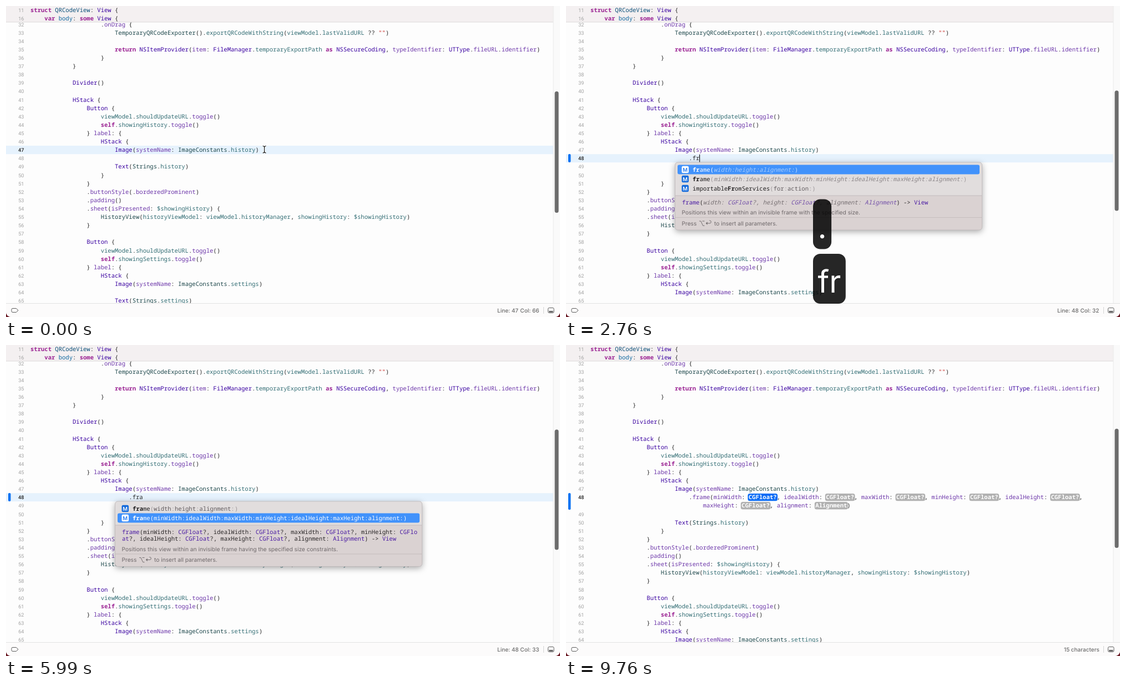
These frames come from a looping animation (998x561 px, 9990 ms). An HTML page with a canvas:

```html
<!DOCTYPE html>
<html lang="en">
<head>
<meta charset="utf-8">
<title>Code completion</title>
<style>
html, body { margin: 0; width: 100%; height: 100%; overflow: hidden; background: #fdfdfd; }
canvas { display: block; }
</style>
</head>
<body>
<canvas id="stage" width="998" height="561"></canvas>
<script>
const ctx = document.getElementById('stage').getContext('2d');
ctx.textRendering = 'geometricPrecision';

const LOOP = 9990;
const CHAR = 19 / 3, ROW = 15.11, LEFT = 44;
const MONO = '10.555px "Noto Sans Mono", monospace';
const SANS = '10.2px Inter, sans-serif';
const PLAIN = '#262626';

// Moments of the key presses
const ENTER = 1040, DOT = 1890, MARK = 2030, LETTERS = [2450, 2650, 3030];
const DOWN = 4090, OPTION = 5190, INSERT = 7170;

const palette = {
  '#9b2393': 'struct var some return as self',
  '#0b4f79': 'QRCodeView',
  '#0f68a0': 'body',
  '#3900a0': 'View NSItemProvider FileManager NSSecureCoding UTType Divider HStack Button Image Text',
  '#1c464a': 'TemporaryQRCodeExporter ImageConstants Strings HistoryView',
  '#326d74': 'exportQRCodeWithString viewModel lastValidURL temporaryExportPath shouldUpdateURL ' +
    'showingHistory $showingHistory history historyViewModel historyManager showingSettings settings',
  '#6c36a9': 'onDrag item typeIdentifier fileURL identifier toggle label systemName buttonStyle ' +
    'borderedProminent padding sheet isPresented frame minWidth idealWidth maxWidth minHeight ' +
    'idealHeight maxHeight alignment',
  '#c41a16': '""'
};
const wordColor = {};
for (const [color, words] of Object.entries(palette))
  for (const word of words.split(' ')) wordColor[word] = color;

const FIRST_LINE = 32;
const source = `                    .onDrag {
                        TemporaryQRCodeExporter().exportQRCodeWithString(viewModel.lastValidURL ?? "")

                        return NSItemProvider(item: FileManager.temporaryExportPath as NSSecureCoding, typeIdentifier: UTType.fileURL.identifier)
                    }
            }

            Divider()

            HStack {
                Button {
                    viewModel.shouldUpdateURL.toggle()
                    self.showingHistory.toggle()
                } label: {
                    HStack {
                        Image(systemName: ImageConstants.history)

                        Text(Strings.history)
                    }
                }
                .buttonStyle(.borderedProminent)
                .padding()
                .sheet(isPresented: $showingHistory) {
                    HistoryView(historyViewModel: viewModel.historyManager, showingHistory: $showingHistory)
                }

                Button {
                    viewModel.shouldUpdateURL.toggle()
                    self.showingSettings.toggle()
                } label: {
                    HStack {
                        Image(systemName: ImageConstants.settings)

                        Text(Strings.settings)`.split('\n');

const longLabels = ['minWidth', 'idealWidth', 'maxWidth', 'minHeight', 'idealHeight', 'maxHeight', 'alignment'];
const shortLabels = ['width', 'height', 'alignment'];
const withTypes = labels => labels.map(l => l + (l === 'alignment' ? ': Alignment' : ': CGFloat?')).join(', ');
const joined = labels => labels.join(':') + ':';
const choices = [
  { name: 'frame', params: joined(shortLabels), optional: true },
  { name: 'frame', params: joined(longLabels), optional: true },
  { name: 'importableFromServices', params: 'for:action:', optional: false }
];
const details = [
  { signature: `frame(${withTypes(shortLabels)}) -> View`,
    note: 'Positions this view within an invisible frame with the specified size.' },
  { signature: `frame(${withTypes(longLabels)}) -> View`,
    note: 'Positions this view within an invisible frame having the specified size constraints.' }
];

const rowY = row => 48 + (row - 33) * ROW;
const columnX = column => LEFT + column * CHAR;

function rect(x, y, w, h, color, radius = 0) {
  ctx.fillStyle = color;
  ctx.beginPath();
  ctx.roundRect(x, y, w, h, radius);
  ctx.fill();
}

function text(str, x, y, color, font, align = 'left') {
  ctx.font = font;
  ctx.fillStyle = color;
  ctx.textAlign = align;
  ctx.fillText(str, x, y + 3.7);
}

// Monospaced text; returns the x after its last column
function mono(str, x, y, color, style = '') {
  text(str, x, y, color, style + ' ' + MONO);
  return x + str.length * CHAR;
}

function codeLine(line, x, y, firstSelected) {
  for (const token of line.match(/CGFloat\?|Alignment|[\w$]+|"[^"]*"| +|[^\w$" ]/g) || []) {
    if (/^(CGFloat\?|Alignment)$/.test(token)) {
      rect(x - 1.5, y - 6.7, token.length * CHAR + 3, 13.4, firstSelected ? '#0a6cf5' : '#b1b1b1', 3.5);
      firstSelected = false;
      x = mono(token, x, y, '#fff', 'bold');
    } else {
      const color = wordColor[token] || PLAIN;
      x = mono(token, x, y, color, color === '#9b2393' ? 'bold' : '');
    }
  }
}

function lineNumber(n, y, current) {
  text(n, 32.5, y, current ? '#222' : '#a3a3a3', (current ? '500 ' : '') + '9.2px Roboto, sans-serif', 'right');
}

const typedLetters = t => 'fra'.slice(0, LETTERS.filter(at => at <= t).length);

function drawEditor(t) {
  const entered = t >= ENTER, inserted = t >= INSERT;
  const current = entered ? 48 : 47;
  const typed = t >= DOT ? '.' + typedLetters(t) : '';
  const column = !entered ? 65 : typed ? 28 + typed.length : 24;

  if (!inserted) rect(0, rowY(current) - 7.5, 986, ROW, '#e6f2fd');

  source.forEach((line, i) => {
    const n = FIRST_LINE + i;
    const added = entered && n > 47;
    const y = rowY(n + (added ? (inserted ? 2 : 1) : 0));
    lineNumber(n + (added ? 1 : 0), y, !entered && n === 47);
    codeLine(line, LEFT, y);
  });

  if (entered) {
    const y = rowY(48);
    lineNumber(48, y, true);
    if (inserted) {
      const args = withTypes(longLabels), cut = args.indexOf(' maxHeight');
      codeLine('.frame(' + args.slice(0, cut), columnX(28), y, true);
      codeLine(args.slice(cut + 1) + ')', columnX(32), y + ROW);
    } else mono(typed, columnX(28), y, PLAIN);
    rect(4, rowY(t < MARK ? 49 : 48) - 7.7, 4.5, inserted ? 2 * ROW : ROW, '#0a73f2', 2);
  }

  const presses = [-600, ENTER, DOT, ...LETTERS, DOWN];
  const lastPress = Math.max(...presses.filter(at => at <= t));
  if (!inserted && (t - lastPress) % 1100 < 550)
    rect(columnX(column) - 0.2, rowY(current) - 7, 1.1, 14, '#000');
  return `${current},${column + 1}`.split(',');
}

function drawChrome(t, [line, column]) {
  rect(0, 0, 986, 29, '#f4f0f1');
  rect(0, 28.5, 986, 1, '#dcd9da');
  lineNumber(11, 7, false);
  lineNumber(16, 22, false);
  codeLine('struct QRCodeView: View {', LEFT, 7);
  codeLine('var body: some View {', columnX(4), 22);

  rect(986, 0, 12, 537, '#fafafa');
  rect(985.5, 0, 1, 537, '#e9e9e9');
  const [top, bottom] = t < ENTER ? [154, 373] : t < INSERT ? [152.5, 369.5] : [151, 366];
  rect(988.5, top, 7, bottom - top, '#6c6c6c', 3.5);

  rect(0, 536, 998, 25, '#fcfbfb');
  rect(0, 536, 998, 1, '#e2e2e2');
  const font = '500 10px Inter, sans-serif', gray = '#6c6c6c';
  if (t >= INSERT) text('15 characters', 961, 549, gray, font, 'right');
  else {
    text('Line: ' + line, 885, 549, gray, font);
    text('Col: ' + column, 960.5, 549, gray, font, 'right');
  }
  rect(968, 543, 1, 12, '#d4d4d4');
  ctx.strokeStyle = '#5c5c5c';
  ctx.lineWidth = 1;
  ctx.stroke(new Path2D('M12 545.5H18.5L22 549L18.5 552.5H12Q10 552.5 10 550.5V547.5Q10 545.5 12 545.5Z'));
  ctx.beginPath();
  ctx.roundRect(976.5, 544.5, 10.5, 9, 2);
  ctx.stroke();
  rect(978, 550, 7.5, 2.5, '#5c5c5c', 0.5);
}

function drawPointer() {
  const beam = new Path2D('M462.5 252.5Q465.5 252.5 465.5 255V262.5Q465.5 265 462.5 265M468.5 252.5Q465.5 252.5 465.5 255M465.5 262.5Q465.5 265 468.5 265');
  for (const [color, width] of [['#fff', 3], ['#111', 1.2]]) {
    ctx.strokeStyle = color;
    ctx.lineWidth = width;
    ctx.stroke(beam);
  }
}

// Key symbols inside a 90 px high cap
const symbols = {
  '↩': { width: 66.5 - 3.5, line: 'M29 45.5H52.5A12.75 12.75 0 0 0 52.5 20H49', fill: 'M15 45.5L30 31V60Z' },
  '⌥': { width: 63, line: 'M16 25H31L51 68H66M45 25H66', fill: '' },
  '↓': { width: 36, line: 'M27 21V54', fill: 'M27 69L12.5 53H41.5Z' }
};

function drawSymbol(name, color) {
  ctx.strokeStyle = ctx.fillStyle = color;
  ctx.lineWidth = 5;
  ctx.stroke(new Path2D(symbols[name].line));
  ctx.fill(new Path2D(symbols[name].fill));
}

function drawSymbols(names, x, y, scale, color) {
  ctx.save();
  ctx.translate(x, y);
  ctx.scale(scale, scale);
  for (const name of names) {
    drawSymbol(name, color);
    ctx.translate(symbols[name].width, 0);
  }
  ctx.restore();
}

function drawChoice({ name, params, optional }, y, match, selected, expanded) {
  if (selected) rect(201, y - 8.5, 544, 17, '#4192fb', 3);
  rect(208.5, y - 6.2, 12.5, 12.5, selected ? '#fff' : '#146bdc', 2.5);
  text('M', 214.7, y - 0.2, selected ? '#2a7df0' : '#fff', '600 9.5px Inter, sans-serif', 'center');

  const ink = selected ? '#fff' : '#1d1b1c';
  const start = name.toLowerCase().indexOf(match), end = start + match.length;
  let x = mono(name.slice(0, start), 228, y, ink);
  x = mono(name.slice(start, end), x, y, ink, 'bold');
  x = mono(name.slice(end), x, y, ink);

  const faint = optional && !expanded;
  const label = selected ? (faint ? '#a8cdfd' : '#fff') : faint ? '#8b8588' : '#625c5f';
  const mark = selected ? (faint ? '#c4defe' : '#fff') : '#9b9598';
  x = mono('(', x, y, selected ? '#fff' : mark);
  for (const part of params.match(/\w+|:/g))
    x = mono(part, x, y, part === ':' ? mark : label, faint ? 'italic' : '');
  mono(')', x, y, mark);
}

function drawSignature(signature, y, expanded) {
  const wrap = 84, close = signature.indexOf(')');
  for (const { 0: token, index } of signature.matchAll(/\w+|[^\w ]/g)) {
    const inside = index > 5 && index < close;
    const faint = inside && !expanded;
    const color = /^(frame|CGFloat|Alignment|View)$/.test(token)
      ? (faint ? '#7350a8' : '#4a1ba3') : faint ? '#777073' : '#2a2728';
    [...token].forEach((char, i) => {
      const column = index + i;
      mono(char, 209 + column % wrap * CHAR, y + Math.floor(column / wrap) * 12.5, color, faint ? 'italic' : '');
    });
  }
}

function drawPopup(t) {
  const match = typedLetters(t);
  const count = match.length < 3 ? 3 : 2;
  const selected = t >= DOWN ? 1 : 0;
  const expanded = t >= OPTION;
  const split = 291 + 17 * count;
  const noteY = split + 30.3 + selected * 12.5;
  const hintTop = noteY + 9.2;

  ctx.save();
  ctx.shadowColor = 'rgba(0,0,0,.35)';
  ctx.shadowBlur = 12;
  ctx.shadowOffsetY = 3;
  rect(196.5, 282, 553, hintTop + 22.5 - 282, '#dad2d2', 5);
  ctx.restore();
  rect(196.5, 282, 553, split - 282, '#e1dddd', [5, 5, 0, 0]);
  ctx.strokeStyle = '#bdb7b8';
  ctx.lineWidth = 0.8;
  ctx.beginPath();
  ctx.roundRect(196.5, 282, 553, hintTop + 22.5 - 282, 5);
  ctx.stroke();
  rect(197, split - 0.5, 552, 1, '#c4bcbd');
  rect(197, hintTop - 0.5, 552, 1, '#c6bebe');

  choices.slice(0, count).forEach((choice, i) =>
    drawChoice(choice, 295 + 17 * i, match, i === selected, expanded));
  drawSignature(details[selected].signature, split + 12, expanded);
  const gray = '#6f696b', hintY = hintTop + 10.5;
  text(details[selected].note, 208.5, noteY, gray, SANS);
  text('Press', 208.5, hintY, gray, SANS);
  drawSymbols('⌥↩', 237, hintY - 8.7, 0.19, gray);
  text('to insert all parameters.', 267, hintY, gray, SANS);
}

const caps = [
  { label: '↩', presses: [ENTER] },
  { label: '.', presses: [DOT] },
  { label: 'fra', presses: LETTERS },
  { label: '↓', presses: [DOWN] },
  { label: '⌥↩', presses: [INSERT] }
];

function drawCaps(t) {
  const shown = caps.filter(cap => cap.presses[0] <= t).reverse();
  shown.forEach(({ label, presses }, i) => {
    const done = presses.filter(at => at <= t);
    const opacity = 1 - (t - done[done.length - 1] - 1200) / 480;
    if (opacity <= 0) return;
    ctx.save();
    ctx.globalAlpha = Math.min(1, opacity);
    ctx.translate(445, 447 - 98.5 * i);
    const isSymbol = label[0] in symbols;
    const str = presses.length > 1 ? label.slice(0, done.length) : label;
    ctx.font = '56px Inter, sans-serif';
    const width = isSymbol
      ? [...str].reduce((sum, name) => sum + symbols[name].width, 20)
      : ctx.measureText(str).width + 17;
    rect(0, 0, width, 90, 'rgba(0,0,0,.85)', 13);
    if (isSymbol) drawSymbols(str, 0, 0, 1, '#fff');
    else text(str, 8.5, 66.5, '#fff', '56px Inter, sans-serif');
    ctx.restore();
  });
}

function draw(now) {
  const t = now % LOOP;
  rect(0, 0, 998, 561, '#6b1c26');
  ctx.save();
  ctx.beginPath();
  ctx.roundRect(0, -20, 998, 581, 9);
  ctx.clip();
  rect(0, 0, 998, 561, '#fdfdfd');
  const position = drawEditor(t);
  drawChrome(t, position);
  if (t < ENTER) drawPointer();
  if (t >= LETTERS[0] && t < INSERT) drawPopup(t);
  drawCaps(t);
  ctx.restore();
  requestAnimationFrame(draw);
}
requestAnimationFrame(draw);
</script>
</body>
</html>
```
